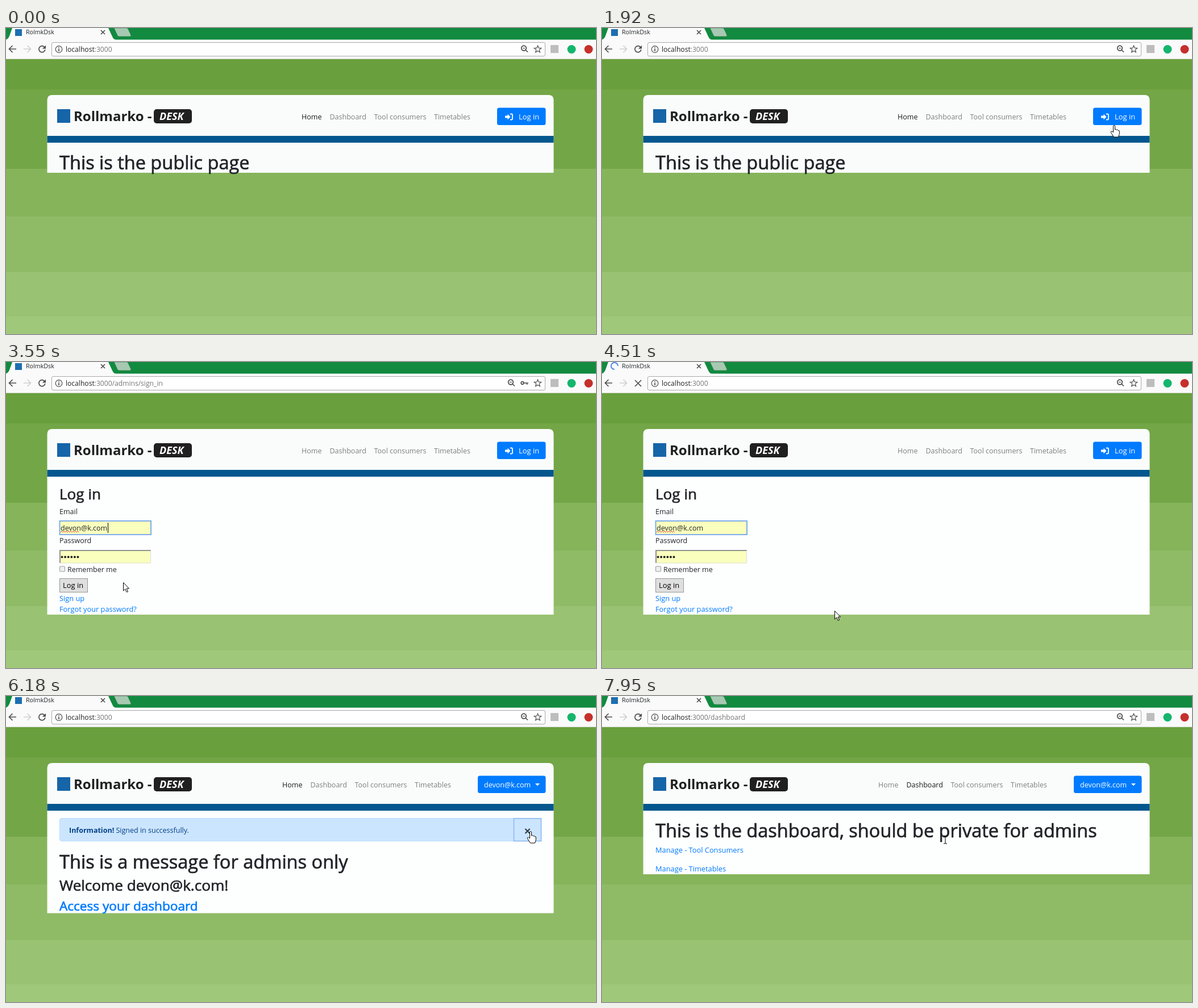
An HTML page that plays this animation: 1038 by 539 pixels, repeating every 8 s.

```html
<!DOCTYPE html>
<html lang="en">
<head>
<meta charset="utf-8">
<title>Sign-in walkthrough</title>
<style>
  html, body { margin: 0; width: 100%; height: 100%; overflow: hidden; }
  svg { display: block; width: 100vw; height: 100vh; }
  text { font: 12.5px "Open Sans", "Noto Sans", sans-serif; fill: #212529; white-space: pre; }
  .h1, .h2, .h3 { stroke: #212529; stroke-width: .7; }
  .h1 { font-size: 32.5px; }
  .h2 { font-size: 26.1px; }
  .h3 { font-size: 22.6px; }
  .link { fill: #007bff; font-size: 12.8px; }
  .h3.link { font-size: 22.6px; stroke: #007bff; }
  .white { fill: #fff; }
  .nav text { fill: #7e7f7f; }
  .nav .active { fill: #1a1a1a; }
  .url { font-size: 12.1px; fill: #222; }
  .url tspan { fill: #757575; }
  .icon { fill: none; stroke: #4d4d4d; stroke-width: 1.7; }
  .thin { stroke-width: 1.2; }
  .body { fill: #fdfefe; }
  .alert text { fill: #004085; }
  .alert .h1, .alert .h2 { fill: #212529; }
</style>
</head>
<body>
<svg viewBox="0 0 1038 539" preserveAspectRatio="none">
  <defs>
    <g id="welcome">
      <path class="body" d="M72.500 202H963.500V327.500H72.500Z"/>
      <text class="h1" x="94" y="249">This is a message for admins only</text>
      <text class="h2" x="94" y="288">Welcome devon@k.com!</text>
      <text class="h3 link" x="94" y="323">Access your dashboard</text>
    </g>
    <g id="zoom" class="icon">
      <circle cx="-1" cy="-1.500" r="4.300"/>
      <path d="M2 1.500L6 5.500"/><path class="thin" d="M-3-1.500H1"/>
    </g>
  </defs>

  <!-- Page background -->
  <g>
    <rect y="54" width="1038" height="54" fill="#6a9f3d"/>
    <rect y="108" width="1038" height="140" fill="#73a646"/>
    <rect y="248" width="1038" height="84" fill="#85b45a"/>
    <rect y="332" width="1038" height="98" fill="#8fbb66"/>
    <rect y="430" width="1038" height="78" fill="#99c272"/>
    <rect y="508" width="1038" height="31" fill="#9fc87a"/>
  </g>

  <!-- Browser chrome -->
  <rect width="1038" height="21" fill="#128a40"/>
  <path d="M0 20.500Q4 19 6 14L11 0H180L187 15Q189 20.500 194 20.500H1038V54H0Z" fill="#fafafa"/>
  <path d="M0 54.500H1038" stroke="#cbd3c4"/>
  <path d="M190 0H212Q214 0 215 2L220 13Q220 15 218 15H199Q197 15 196 13Z" fill="#a7c9b2" stroke="#2f7d4d" stroke-width=".8"/>
  <rect data-on="0 3930 5550 8000" x="16" y="2" width="12" height="12" fill="#1d6fb0"/>
  <path id="spinner" data-on="3930 5550" d="M16 7A6 6 0 1 0 22 1" fill="none" stroke="#5286ea" stroke-width="2"/>
  <text x="35" y="11" style="font-size:10.7px">RolmkDsk</text>
  <path class="icon" d="M167 4L174 11M174 4L167 11"/>
  <path class="icon" d="M18 37H6M11.500 31L5.500 37L11.500 43"/>
  <path class="icon" d="M31 37H43M37.500 31L43.500 37L37.500 43" style="stroke:#cfcfcf"/>
  <g data-on="0 3930 5550 8000">
    <path class="icon" d="M67.500 33.500A5.500 5.500 0 1 0 68.800 38"/>
    <path d="M70 30.500V36.500H64Z" fill="#4d4d4d"/>
  </g>
  <path class="icon" data-on="3930 5550" d="M58 32L69 43M69 32L58 43"/>
  <rect x="80.500" y="25.500" width="868" height="24" rx="2.500" fill="#fff" stroke="#a9a9a9"/>
  <circle class="icon thin" cx="93" cy="37.500" r="5.800"/>
  <path class="icon" d="M93 36.500V41M93 33.700V35.200"/>
  <text class="url" x="105" y="42">localhost<tspan>:3000</tspan><tspan data-on="2230 4500">/admins/sign_in</tspan><tspan data-on="7440 8000">/dashboard</tspan></text>
  <use href="#zoom" x="912" y="37" data-on="0 2660 4500 8000"/>
  <g data-on="2660 4500">
    <use href="#zoom" x="889" y="37"/>
    <circle class="icon" cx="908.500" cy="37" r="2.300"/>
    <path class="icon" d="M911 37H919M916.500 37V40"/>
  </g>
  <path class="icon thin" d="M935.500 31L937.200 35.200L941.700 35.500L938.200 38.400L939.400 42.800L935.500 40.400L931.600 42.800L932.800 38.400L929.300 35.500L933.800 35.200Z"/>
  <rect x="958" y="30" width="14" height="14" fill="#bdbdbd"/>
  <circle cx="995" cy="37.500" r="7.500" fill="#15b56d"/>
  <circle cx="1025" cy="37.500" r="7.500" fill="#c5302b"/>

  <!-- Site header -->
  <path d="M72.500 202V127Q72.500 118 81.500 118H954.500Q963.500 118 963.500 127V202Z" fill="#fafcfc"/>
  <rect x="90" y="143" width="23" height="24" fill="#1565a8"/>
  <text x="119" y="164" style="font-size:24px;font-weight:700;fill:#202020">Rollmarko -</text>
  <rect x="260" y="143" width="67" height="25" rx="5" fill="#202020"/>
  <text class="white" x="270" y="162" style="font-size:18px;font-weight:700;font-style:italic">DESK</text>
  <rect x="72.500" y="190" width="891" height="12" fill="#03578e"/>

  <g class="nav" data-on="0 2660" data-active="0" data-shift="0"></g>
  <g class="nav" data-on="2660 4810" data-active="-1" data-shift="0"></g>
  <g class="nav" data-on="4810 7650" data-active="0" data-shift="-34"></g>
  <g class="nav" data-on="7650 8000" data-active="1" data-shift="-34"></g>

  <g data-on="0 4810">
    <rect x="864" y="140.500" width="85.500" height="30.500" rx="3.500" fill="#007bff"/>
    <rect data-on="2000 2660" x="864" y="140.500" width="85.500" height="30.500" rx="3.500" fill="#0069d9"/>
    <rect data-on="2150 2660" x="862.700" y="139.200" width="88.100" height="33.100" rx="5" fill="none" stroke="#80bdff" stroke-width="2.600"/>
    <path class="white" d="M878 154.500H882.500V151.500L887.500 156.500L882.500 161.500V158.500H878Z"/>
    <path d="M887 151.500H889.500Q891 151.500 891 153V160Q891 161.500 889.500 161.500H887" fill="none" stroke="#fff" stroke-width="1.800"/>
    <text class="white" x="902" y="161" style="font-size:12.900px">Log in</text>
  </g>
  <g data-on="4810 8000">
    <rect x="830" y="140.500" width="119.500" height="30.500" rx="3.500" fill="#007bff"/>
    <text class="white" x="841" y="161">devon@k.com</text>
    <path class="white" d="M931 154H939L935 158.200Z"/>
  </g>

  <!-- Public page -->
  <g data-on="0 2660">
    <path d="M72.500 202H963.500V255H72.500Z" fill="#fafcfc"/>
    <text class="h1" x="94" y="249">This is the public page</text>
  </g>

  <!-- Login form -->
  <g data-on="2660 4810">
    <path class="body" d="M72.500 202H963.500V445H72.500Z"/>
    <text class="h2" x="94" y="242">Log in</text>
    <text x="94" y="268">Email</text>
    <rect x="94.500" y="280" width="160.500" height="24" fill="#faffbd" stroke="#7eaeea" stroke-width="2"/>
    <text x="96" y="297">devon@k.com</text>
    <path id="squiggle" fill="none" stroke="#e04a3a"/>
    <path data-on="2660 2940 3470 4000 4530 4810" d="M179.500 283V301" stroke="#000"/>
    <text x="94" y="319">Password</text>
    <rect x="94" y="331" width="161" height="24" fill="#faffbd"/>
    <path d="M95 354V332H255" fill="none" stroke="#929292" stroke-width="2"/>
    <path d="M95 354H254.500V332" fill="none" stroke="#dedede"/>
    <path d="M98.500 343.500H128" stroke="#222" stroke-width="4" stroke-linecap="round" stroke-dasharray="0 5.600"/>
    <rect x="94.500" y="360" width="9" height="9" rx="1" fill="#eee" stroke="#999"/>
    <text x="108" y="370">Remember me</text>
    <rect x="94.500" y="381.500" width="49" height="24" fill="#dfdfdf" stroke="#979797"/>
    <text x="100" y="398" style="font-size:12.900px;fill:#000">Log in</text>
    <text class="link" x="94" y="421">Sign up</text>
    <text class="link" x="94" y="440">Forgot your password?</text>
  </g>

  <!-- Admin home, with and without the notice -->
  <g class="alert" data-on="4810 6330">
    <use href="#welcome" y="55"/>
    <path class="body" d="M72.500 202H963.500V258H72.500Z"/>
    <rect x="94.500" y="215.500" width="847" height="40" rx="3.500" fill="#cce5ff" stroke="#b8daff"/>
    <text x="111" y="241"><tspan font-weight="700">Information!</tspan> Signed in successfully.</text>
    <path d="M913.500 234L921.500 242M921.500 234L913.500 242" stroke="#7890aa" stroke-width="1.800"/>
    <path data-on="6030 6330" d="M913.500 234L921.500 242M921.500 234L913.500 242" stroke="#333f4b" stroke-width="2"/>
    <rect data-on="6100 6330" x="893.500" y="215.700" width="48" height="39.800" fill="none" stroke="#8bb8ee" stroke-width="1.600"/>
  </g>
  <use href="#welcome" data-on="6330 7650"/>

  <!-- Dashboard -->
  <g data-on="7650 8000">
    <path class="body" d="M72.500 202H963.500V314H72.500Z"/>
    <text class="h1" x="94" y="249">This is the dashboard, should be private for admins</text>
    <text class="link" x="94" y="276">Manage - Tool Consumers</text>
    <text class="link" x="94" y="309">Manage - Timetables</text>
  </g>

  <g id="cursor" fill="#fff" stroke="#000" stroke-linejoin="round">
    <path data-shape="arrow" d="M.5.500V15L3.800 11.900L6.200 17.400L8.500 16.400L6.100 11H10.500Z"/>
    <path data-shape="hand" d="M-1.500 1.500Q0-1 1.500 1.500V8Q3.500 6.500 4.300 8.500Q6.300 7.500 7 9.400Q9.300 8.800 9.300 11V15.500L7.500 21H-.5L-5.300 13.500Q-6.500 11.300-4.500 10.700Q-3 10.800-1.500 13Z"/>
    <path data-shape="beam" fill="none" d="M-3-7H-1L0-6L1-7H3M0-6V6M-3 7H-1L0 6L1 7H3"/>
  </g>
</svg>

<script>
const LOOP = 8000, TICK = 72;
const NAV = [["Home", 520], ["Dashboard", 569.5], ["Tool consumers", 647.5], ["Timetables", 753]];

// time, x, y, pointer shape from here on
const PATH = [
  [830, 720, 539, "arrow"], [1060, 735, 477], [1200, 775, 415], [1340, 822, 350],
  [1480, 862, 327], [1620, 883, 286], [1700, 890, 270], [1780, 906, 236],
  [1900, 901, 171, "hand"], [2660, 901, 171, "arrow"], [2800, 868, 220], [2900, 846, 245],
  [3300, 230, 380], [3410, 206, 388], [3600, 206, 388], [3770, 434, 419],
  [3930, 434, 419], [4200, 409, 438], [5520, 409, 438], [5600, 432, 414],
  [5680, 432, 414], [6030, 923, 238, "hand"], [6330, 923, 238, "arrow"], [6400, 897, 234],
  [6630, 897, 234], [6950, 655, 219], [7010, 655, 219], [7340, 578, 138, "hand"],
  [7600, 578, 138, "arrow"], [7850, 604, 253, "beam"], [8000, 604, 253]
];

for (const nav of document.querySelectorAll(".nav")) {
  const { active, shift } = nav.dataset;
  nav.innerHTML = NAV.map(([label, x], i) =>
    `<text x="${x + +shift}" y="161" class="${i == active ? "active" : ""}">${label}</text>`).join("");
}
document.getElementById("squiggle").setAttribute("d", "M96 300" + "l2-2l2 2".repeat(8));

const timed = [...document.querySelectorAll("[data-on]")].map(el => ({
  el, times: el.dataset.on.split(" ").map(Number)
}));
const cursor = document.getElementById("cursor");
const spinner = document.getElementById("spinner");
const show = (el, on) => { el.style.display = on ? "" : "none"; };

function placeCursor(t) {
  show(cursor, t >= PATH[0][0]);
  const next = PATH.findIndex(p => p[0] > t);
  if (next < 1) return;
  const [t0, x0, y0] = PATH[next - 1], [t1, x1, y1] = PATH[next];
  const k = (t - t0) / (t1 - t0);
  cursor.setAttribute("transform", `translate(${x0 + (x1 - x0) * k} ${y0 + (y1 - y0) * k})`);
  const shape = PATH.slice(0, next).reverse().find(p => p[3])[3];
  for (const el of cursor.children) show(el, el.dataset.shape === shape);
}

function draw(now) {
  const t = now % LOOP;
  for (const { el, times } of timed) {
    show(el, times.filter(limit => limit <= t).length % 2 === 1);
  }
  // The pointer and spinner advance in small steps, as in a screen recording.
  const stepped = 830 + Math.floor((t - 830) / TICK) * TICK;
  placeCursor(stepped);
  spinner.setAttribute("transform", `rotate(${stepped * 0.36} 22 7)`);
}

const start = performance.now();
function frame() {
  draw(performance.now() - start);
  requestAnimationFrame(frame);
}
frame();
</script>
</body>
</html>
```
